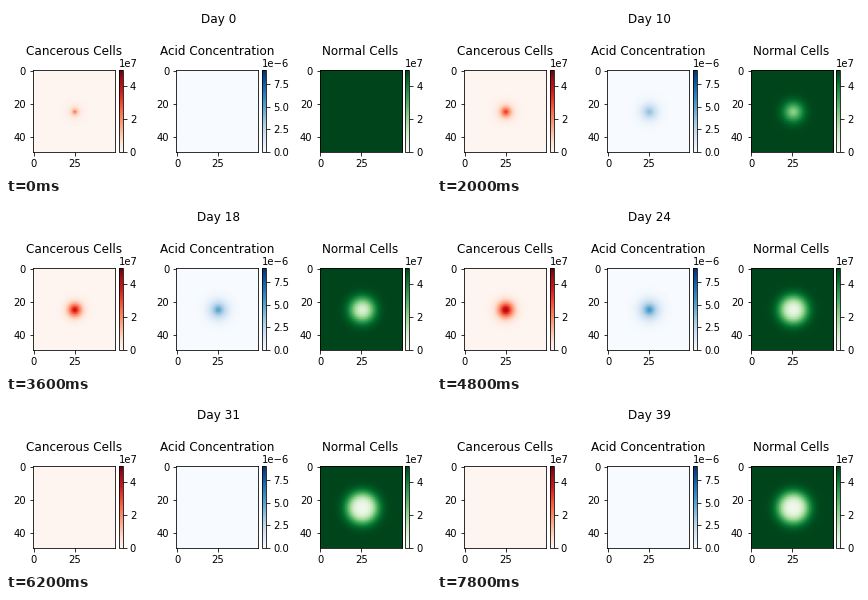
Animation of 425x170 px, one loop 8000 ms. Source, as a matplotlib script:

```python
import numpy as np
import matplotlib.pyplot as plt
from matplotlib.animation import FuncAnimation

W, H, DPI = 425, 170, 80
PX = 72 / DPI            # points per pixel
DAYS, STEP_MS = 40, 200
REMOVAL_DAY = 31         # tumour and acid are gone from this day on
N = 50
CELLS_MAX, ACID_MAX = 5e7, 9e-6
LEFT, TOP, SIDE, SPACING = 27.1, 64.1, 82, 143.2

plt.rcParams.update({
    "font.family": "DejaVu Sans",
    "font.size": 10 * PX,
    "axes.linewidth": 0.8 * PX,
    "xtick.major.size": 3.5 * PX, "ytick.major.size": 3.5 * PX,
    "xtick.major.pad": 3.5 * PX, "ytick.major.pad": 3.5 * PX,
    "xtick.major.width": 0.8 * PX, "ytick.major.width": 0.8 * PX,
})

row, col = np.mgrid[:N, :N]
R = np.hypot(row - 25, col - 25)


def tumour(day):
    if day >= REMOVAL_DAY:
        return np.zeros((N, N))
    peak = 2.6e7 + 0.078e7 * day
    width = 1.9 + 3.1 * (day / 28) ** 0.8
    power = 1 + 0.6 * min(day / 18, 1)
    return peak * np.exp(-(R / width) ** power)


def acid_profile(day):
    level = 0.7 * (1 - np.exp(-day / 11))
    return level * np.exp(-(R / (4.2 + 0.035 * day)) ** 1.5)


def acid(day):
    if day >= REMOVAL_DAY:
        return np.zeros((N, N))
    return ACID_MAX * acid_profile(day)


def normal(day):
    dose = sum((acid_profile(d) for d in range(min(day, REMOVAL_DAY))),
               np.zeros((N, N)))
    return CELLS_MAX / (1 + 0.25 * dose) ** 2


fig = plt.figure(figsize=(W / DPI, H / DPI), dpi=DPI, facecolor="white")


def box(x, y, w, h):
    return fig.add_axes([x / W, 1 - (y + h) / H, w / W, h / H])


def label(x, y, text, size, ha="center"):
    return fig.text(x / W, 1 - y / H, text, fontsize=size * PX,
                    ha=ha, va="baseline")


def panel(slot, title, field, cmap, top, ticks, names, power):
    x = LEFT + slot * SPACING
    bar_x = x + SIDE + 3.6
    ax = box(x, TOP, SIDE, SIDE)
    im = ax.imshow(field(0), cmap=cmap, vmin=0, vmax=top,
                   interpolation="antialiased")
    ax.set_xticks([0, 25])
    ax.set_yticks([0, 20, 40])
    bar = fig.colorbar(im, cax=box(bar_x, TOP, 4.1, SIDE))
    bar.set_ticks(ticks, labels=names)
    label(x + SIDE / 2, 49, title, 12)
    label(bar_x, 61, power, 10, "left")
    return im, field


panels = [
    panel(0, "Cancerous Cells", tumour, "Reds", CELLS_MAX,
          [0, 2e7, 4e7], ["0", "2", "4"], "1e7"),
    panel(1, "Acid Concentration", acid, "Blues", ACID_MAX,
          [0, 2.5e-6, 5e-6, 7.5e-6], ["0.0", "2.5", "5.0", "7.5"],
          "1e\u22126"),
    panel(2, "Normal Cells", normal, "Greens", CELLS_MAX,
          [0, 2e7, 4e7], ["0", "2", "4"], "1e7"),
]
heading = label(W / 2, 17, "Day 0", 12)


def update(day):
    heading.set_text(f"Day {day}")
    for im, field in panels:
        im.set_data(field(day))
    return [heading] + [im for im, _ in panels]


anim = FuncAnimation(fig, update, frames=DAYS, interval=STEP_MS,
                     repeat=True, repeat_delay=0, blit=False)
plt.show()
```
